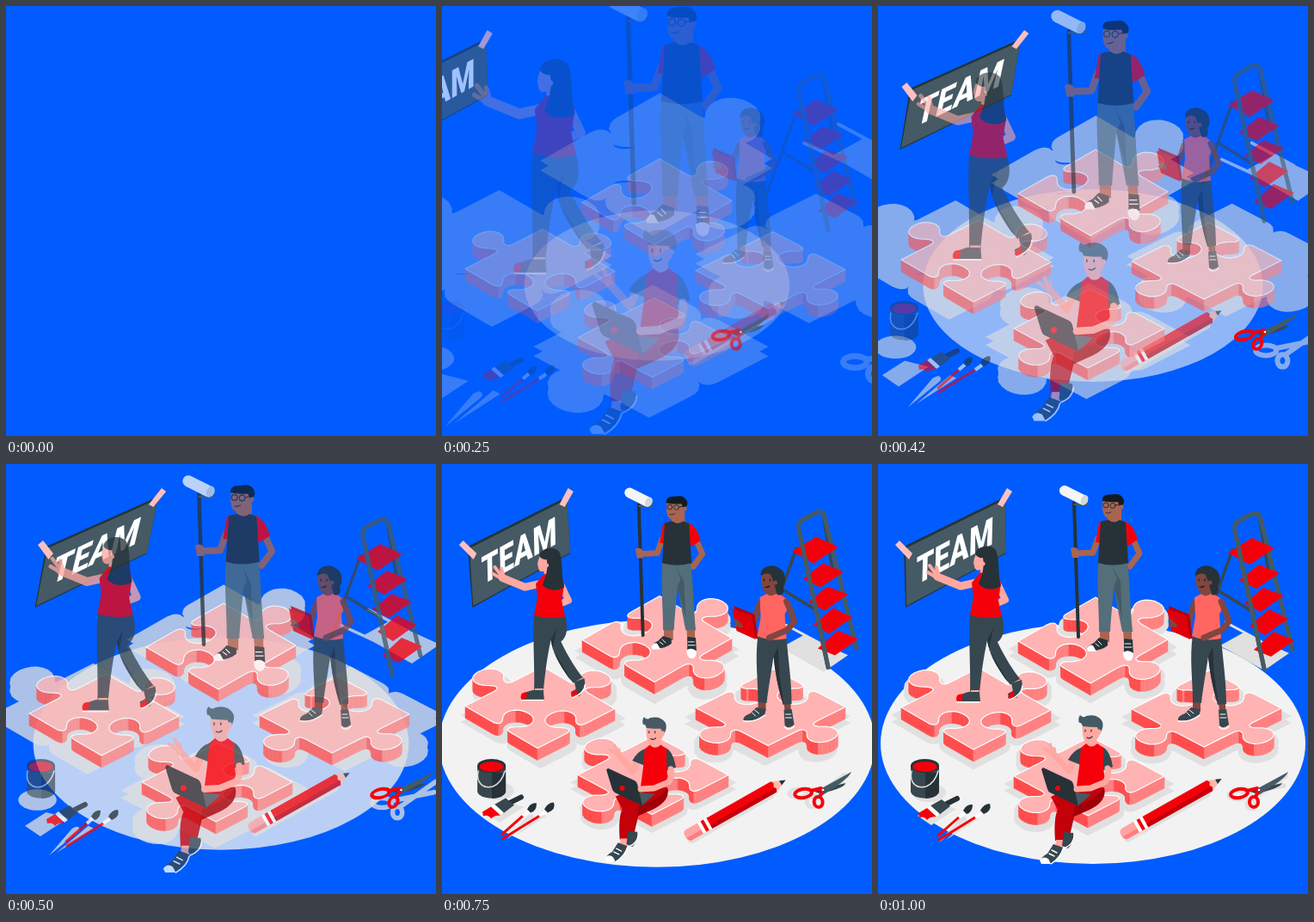
An HTML page for the animation above (1040 ms loop, 500 by 500 pixels).

```html
<!DOCTYPE html>
<html lang="en">
<head>
<meta charset="utf-8">
<title>Team</title>
<style>
html, body { margin: 0; width: 100%; height: 100%; overflow: hidden; background: #005cff; }
svg { display: block; width: 100vw; height: 100vh; }
.in { opacity: var(--p); }
.grow { transform: scale(calc(.5 + .5 * var(--p))); }
.shrink { transform: scale(calc(1.5 - .5 * var(--p))); }
.up { transform: translateY(calc(30px - 30px * var(--p))); }
.down { transform: translateY(calc(30px * var(--p) - 30px)); }
.side { transform: translateX(calc(30px * var(--p) - 30px)); }
.dash { opacity: var(--o); transform: translateX(var(--dx)) skewX(var(--skew)); }
.limb { fill: none; stroke-linecap: round; stroke-linejoin: round; }
.word { font: 900 40px Roboto, Inter, sans-serif; fill: #fff; }
</style>
</head>
<body>
<svg viewBox="0 0 500 500">
  <g class="in grow" style="transform-origin:250px 325px">
    <ellipse cx="250" cy="325" rx="247" ry="140" fill="#f2f2f2"/>
  </g>

  <g id="shadows" class="in shrink" style="transform-origin:252px 308px" fill="#e0e0e0" stroke="#e0e0e0">
    <g stroke="none">
      <path d="M398 211L425 196 478 220 449 240Z"/>
      <ellipse cx="59" cy="382" rx="20" ry="11"/>
      <path d="M46 409L68 395 91 401 62 420Z"/>
      <path d="M71 440L95 412Q103 407 103 414ZM79 437L112 409 118 412Z"/>
    </g>
    <path class="limb" stroke-width="3" d="M375 200L425 223M404 184L445 206"/>
    <g class="limb" stroke-width="5" transform="translate(0 -2)">
      <ellipse cx="418" cy="387" rx="10" ry="5"/><ellipse cx="434" cy="397" rx="5" ry="6"/>
      <path d="M428 385L472 376M437 391L474 365"/>
    </g>
  </g>

  <g class="in up">
    <g class="limb" stroke="#37474f" stroke-width="3.5">
      <path d="M412 100L378 195M444 66L455 130M397 148L436 172"/>
      <path stroke="#455a64" stroke-width="5" d="M482 216L445 64Q443 55 435 58L420 66Q413 70 415 78L449 238"/>
    </g>
    <g fill="#f5000a">
      <path d="M407 103L435 86 461 98 432 117Z"/><path d="M420 135L443 117 467 127 440 145Z"/>
      <path d="M426 162L448 144 472 153 445 172Z"/><path d="M432 188L455 169 477 180 450 199Z"/>
      <path d="M437 216L460 195 484 205 457 224Z"/>
    </g>
    <path class="limb" stroke="#455a64" stroke-width="5" d="M416 82L449 238"/>
  </g>

  <g class="in side"><g class="in side">
    <path fill="#37474f" d="M38 351V381C40 391 69 391 71 381V351Z"/>
    <path fill="#263238" d="M55 359H71V381C70 386 62 389 55 389Z"/>
    <ellipse cx="54.500" cy="351" rx="16.500" ry="8" fill="#263238"/>
    <ellipse cx="54.500" cy="352" rx="14" ry="6" fill="#f5000a"/>
    <path class="limb" stroke="#e0e0e0" stroke-width="1.500" d="M39 357C36 371 45 378 56 375Q66 371 70 357"/>
  </g></g>

  <g class="in up">
    <path class="limb" stroke="#263238" stroke-width="6" d="M78 396L92 389"/>
    <path fill="#37474f" d="M60 398L74 390 84 398 71 408Z"/>
    <path fill="#fff" d="M57 400L61 397 72 407 68 410Z"/>
    <path fill="#f5000a" d="M47 406L57 400 68 410Q60 410 57 414 54 409 48 411Z"/>
    <g class="limb">
      <path stroke="#f5000a" stroke-width="3" d="M70 432L96 409M71 437L116 409"/>
      <path stroke="#fff" stroke-width="4" stroke-linecap="butt" d="M94 411L101 405M113 411L121 405.500"/>
    </g>
    <path fill="#263238" d="M99 403Q103 395 110 396 110 405 103 407ZM119 403Q123 395 130 395 133 403 123 407Z"/>
  </g>

  <g class="in down">
    <g transform="translate(290 428) rotate(-29.500)">
      <path fill="#e0e0e0" d="M-8 6H108L104 11H-2Q-8 11-8 6Z"/>
      <rect x="-8" y="-7" width="24" height="14" rx="5" fill="#ffa3a3"/>
      <path fill="#ff7d7d" d="M-7 2H16V7H-3Q-7 7-7 2Z"/>
      <path fill="#fff" d="M12-7H26V7H12Z"/>
      <path fill="#f5000a" d="M16-7H20V7H16ZM24-7H110L113-3 110 0 113 4 110 7H24Z"/>
      <path fill="#c4000a" d="M24 2H112L110 7H24Z"/>
      <path fill="#ffb8a8" d="M110-7L121-2V2L110 7 112 3 110 0 112-4Z"/>
      <path fill="#263238" d="M119-3L126 0 119 3Z"/>
    </g>
  </g>

  <g id="pieces" class="in up"></g>

  <g class="dash" style="transform-origin:92px 98px">
    <path fill="#263238" d="M30 96L148 38 149 104 32 167Z"/>
    <path fill="#455a64" d="M32 98L148 41 149 103 33 165Z"/>
    <text class="word" transform="matrix(.82 -.44 -.03 1.13 44 141)">TEAM</text>
    <path fill="#ffbfbf" d="M20 94L25 89 40 104 36 111ZM139 47L150 28 156 32 145 50Z"/>
  </g>

  <g class="in shrink" style="transform-origin:112px 186px">
    <path class="limb" stroke="#ffa8a0" stroke-width="8" d="M139 139L148 158 138 162"/>
    <path fill="#37474f" d="M107 174L144 176C148 192 146 202 139 207 148 226 157 240 166 251L154 257C142 241 130 225 127 205 122 228 120 246 118 267H107C108 240 105 200 107 174Z"/>
    <path fill="#263238" d="M127 205L134 191 129 216 152 254 148 250C137 234 129 220 127 205Z"/>
    <path fill="#ffa8a0" d="M108 263H118L117 270H107ZM154 256L165 250 166 256 157 260Z"/>
    <path fill="#37474f" d="M105 265L118 265 119 276H92Q91 271 96 268ZM155 255L167 251Q170 262 161 272L152 272 151 267 157 264Z"/>
    <path fill="#f5000a" d="M91 274Q91 266 99 268L97 276H92ZM151 271L157 263 159 272 153 274Z"/>
    <path class="limb" stroke="#fff" stroke-width="1.500" d="M92 277H118M153 274Q167 269 168 258"/>
    <path class="limb" stroke="#ffa8a0" stroke-width="9" d="M114 138L96 142 69 131"/>
    <path class="limb" stroke="#ffa8a0" stroke-width="4" d="M69 130L60 118M68 132L58 126M70 127L68 120"/>
    <path fill="#ffa8a0" d="M114 104C112 110 110 114 112 118 112 124 117 124 119 123L118 130 128 131 127 106Z"/>
    <path fill="#f5000a" d="M109 138L119 126C129 131 140 128 143 138L140 159 144 177C132 180 116 179 107 175 109 164 112 155 110 148Z"/>
    <path fill="#263238" d="M113 105C115 95 130 92 137 100 142 111 139 129 143 142 134 148 122 146 117 139 121 129 124 121 122 109Q117 110 113 105Z"/>
    <circle cx="122" cy="116" r="2.500" fill="#ffa8a0"/>
  </g>

  <g class="in shrink" style="transform-origin:259px 126px">
    <path class="limb" stroke="#263238" stroke-width="4" d="M228 45L233 201"/>
    <path class="limb" stroke="#455a64" stroke-width="2" d="M228 47L243 47 243 43"/>
    <path class="limb" stroke="#f5f5f5" stroke-width="12" d="M217 31L238 41.500"/>
    <ellipse cx="240" cy="42" rx="4" ry="6" fill="#cfd8dc" transform="rotate(25 240 42)"/>
    <g class="limb" stroke="#a86550" stroke-width="7">
      <path d="M256 86L250 103 229 104"/><path d="M296 86L304 104 293 119"/>
    </g>
    <path fill="#a86550" d="M224 98Q230 95 233 100V109H226ZM258 192H269V207H258ZM285 192H295V208H286Z"/>
    <path fill="#546e7a" d="M256 114L290 114C293 138 293 165 296 195H284C280 175 277 158 274 143 273 160 271 176 270 195H257C257 165 254 140 256 114Z"/>
    <path fill="#455a64" d="M274 143L278 134 273 120 282 137 284 180Z"/>
    <path fill="#263238" d="M257 202L267 205 267 211Q259 218 244 217 243 211 251 208ZM286 203L296 204 297 222Q291 227 286 222Z"/>
    <path fill="#fff" d="M243 215Q246 209 250 211L254 218H244ZM285 219Q291 215 297 220 297 229 291 229 285 228 285 219Z"/>
    <path class="limb" stroke="#fff" stroke-width="1" d="M253 209L257 212M256 206L260 210M287 209H294M287 213H295"/>
    <path fill="#a86550" d="M265 56L283 50V68Q273 73 268 67Z"/>
    <path fill="#f5000a" d="M257 68L266 65 264 92 253 91ZM281 66Q296 66 302 88L291 95 285 90Z"/>
    <path fill="#263238" d="M259 67L268 65Q274 70 281 65L288 68 291 115Q273 120 256 115Z"/>
    <path fill="#a86550" d="M262 41C260 50 261 58 265 62 273 64 280 59 281 52L285 48 283 40Z"/>
    <path fill="#111c22" d="M261 43C260 34 270 36 275 35 283 34 287 41 286 45L282 52 279 44Q268 45 261 43Z"/>
    <g class="limb" stroke="#263238">
      <circle cx="265" cy="48" r="3"/><circle cx="273" cy="48.500" r="3"/><path d="M276 48L281 47M265 57Q268 58 271 56"/>
    </g>
    <circle cx="283" cy="50" r="2.500" fill="#a86550"/>
  </g>

  <g class="in side">
    <path class="limb" stroke="#80463f" stroke-width="7" d="M368 162L361 183 346 188"/>
    <path fill="#b5000a" d="M338 165L362 175 366 204 343 193Z"/>
    <path fill="#e0000a" d="M336 168L359 177 363 204 341 194Z"/>
    <path class="limb" stroke="#80463f" stroke-width="4" d="M340 182L346 188 340 187"/>
    <path fill="#80463f" d="M366 273H375V287H366ZM396 276H404V288H397Z"/>
    <path fill="#37474f" d="M366 199L399 202C401 228 405 252 405 279L395 280C389 260 386 242 384 224 381 244 378 260 376 278L366 277C366 250 362 225 366 199Z"/>
    <path fill="#263238" d="M384 224L389 213 391 246 396 280C388 258 386 242 384 224Z"/>
    <path fill="#37474f" d="M364 283L375 285 374 291Q361 301 349 298 348 293 357 290ZM396 286L405 285 408 303Q402 309 397 304Z"/>
    <path class="limb" stroke="#fff" stroke-width="1.500" d="M349 299Q362 301 374 292M397 306Q402 311 408 305"/>
    <path class="limb" stroke="#fff" stroke-width="1" d="M359 289L363 293M362 286L367 290M398 291H404M398 295H405"/>
    <path fill="#80463f" d="M374 141L388 139 387 154Q380 159 375 153Z"/>
    <path fill="#ff6662" d="M368 155L376 151Q382 156 388 150 399 154 402 164L397 175 399 203Q381 207 365 200L369 178Z"/>
    <path class="limb" stroke="#80463f" stroke-width="7" d="M399 160Q404 170 408 183L400 193 379 202"/>
    <path fill="#80463f" d="M371 124C368 134 370 146 374 148 382 150 386 143 388 140L389 124Z"/>
    <path fill="#263238" d="M369 130C368 119 383 115 390 121 399 125 399 138 395 142 397 149 395 154 388 152L385 140 381 129Q377 125 369 130Z"/>
    <path class="limb" stroke="#2b1512" stroke-width="1.200" d="M373 134V136M380 134V136M374 143Q377 144 379 142"/>
    <circle cx="386" cy="138" r="2.500" fill="#80463f"/>
  </g>

  <g class="in shrink" style="transform-origin:232px 378px">
    <path class="limb" stroke="#ffa8a0" stroke-width="7" d="M227 345L222 357 205 338"/>
    <path class="limb" stroke="#ffa8a0" stroke-width="3.500" d="M204 338L194 331M204 336L200 326M206 337L205 331"/>
    <path fill="#a00008" d="M228 388L263 376Q267 392 246 402L228 410 223 432 212 431Z"/>
    <path fill="#c4000a" d="M201 387Q215 379 232 377L262 376Q259 388 229 398L221 438 206 438Q204 412 209 402Z"/>
    <path fill="#ffa8a0" d="M207 437H218L215 446H206Z"/>
    <path fill="#37474f" d="M216 428L227 429Q229 438 221 447L214 444ZM204 442L215 446Q212 457 200 465L189 463Q189 457 197 453Z"/>
    <path fill="#fff" d="M188 461Q192 455 198 459L201 465H190Z"/>
    <path class="limb" stroke="#fff" stroke-width="1.400" d="M201 465Q213 458 215 448M216 447Q227 443 228 433M199 453L205 456M202 449L208 452"/>
    <path fill="#37474f" d="M236 330L244 326 236 350 221 344Q227 333 236 330ZM256 328Q269 328 273 352L260 357Z"/>
    <path fill="#ffa8a0" d="M241 316L254 316 255 328Q248 334 241 327Z"/>
    <path fill="#f5000a" d="M236 330L242 325Q248 332 255 325L262 330 262 354 265 373Q250 381 231 375L234 352Z"/>
    <path fill="#ffa8a0" d="M238 302C237 312 238 321 243 324 251 326 256 319 258 314L260 301 249 297Z"/>
    <path fill="#455a64" d="M238 305Q236 300 234 301 232 296 235 292 239 296 242 293 254 290 260 298 264 304 258 314L255 306Q246 306 238 305Z"/>
    <path class="limb" stroke="#263238" stroke-width="1.200" d="M241 309V311M248 309V311M243 318Q246 320 249 317"/>
    <circle cx="257" cy="311" r="2.600" fill="#ffa8a0"/>
    <path fill="#455a64" d="M222 381L248 384 232 398Z"/>
    <path fill="#263238" d="M192 353L224 368Q226 369 227 372L233 398 200 382Q198 381 197 378L190 355Z"/>
    <circle cx="209" cy="377" r="3" fill="#f5000a"/>
    <path class="limb" stroke="#ffa8a0" stroke-width="7" d="M267 354Q269 364 264 370L247 377 231 378"/>
  </g>

  <g class="dash" style="transform-origin:442px 380px">
    <path fill="#37474f" d="M430 380L470 371Q466 378 439 383Z"/>
    <path fill="#455a64" d="M437 388L442 377 477 358Q474 366 444 384Z"/>
    <g class="limb" stroke="#f5000a" stroke-width="4">
      <ellipse cx="420" cy="383" rx="10" ry="5" transform="rotate(-10 420 383)"/>
      <ellipse cx="437" cy="393" rx="5" ry="6"/>
      <path d="M429 380L441 377M439 387L442 381"/>
    </g>
    <circle cx="443" cy="379" r="1.300" fill="#fff"/>
  </g>
</svg>
<script>
// Jigsaw pieces: the fourth corner follows from the other three;
// knobs list the four edges from lower left, counter-clockwise: 1 out, -1 in.
const pieces = [
  { left: [163, 206], right: [337, 204], top: [253, 155], knobs: [-1, 1, 1, -1] },
  { left: [27, 283], right: [201, 286], top: [117, 237], knobs: [-1, -1, 1, 1] },
  { left: [295, 285], right: [469, 284], top: [385, 240], knobs: [1, 1, -1, -1] },
  { left: [158, 363], right: [333, 363], top: [247, 317], knobs: [1, -1, -1, 1] }
];
const half = [[.37, 0], [.46, 0], [.45, .06], [.41, .1], [.29, .2], [.35, .35], [.5, .35]];
const knob = half.concat(half.slice(0, -1).reverse().map(([a, n]) => [1 - a, n]));
const depth = 14;

function bezier(a, b, c, d, t) {
  const s = 1 - t;
  return s * s * s * a + 3 * s * s * t * b + 3 * s * t * t * c + t * t * t * d;
}

const profile = [[0, 0]];
for (let i = 0; i < knob.length - 1; i += 3) {
  for (let j = 0; j <= 8; j++) {
    profile.push([0, 1].map(k => bezier(...knob.slice(i, i + 4).map(q => q[k]), j / 8)));
  }
}

function outline({ left, right, top, knobs }) {
  const bottom = [0, 1].map(k => left[k] + right[k] - top[k]);
  const corners = [left, bottom, right, top];
  return corners.flatMap((from, i) => {
    const to = corners[(i + 1) % 4], prev = corners[(i + 3) % 4];
    return profile.map(([a, n]) => [0, 1].map(k =>
      from[k] + a * (to[k] - from[k]) + knobs[i] * n * (from[k] - prev[k])));
  });
}

function walls(points) {
  return points.map((p, i) => [p, points[(i + 1) % points.length]])
    .filter(([p, q]) => q[0] > p[0])
    .sort((a, b) => a[0][1] + a[1][1] - b[0][1] - b[1][1])
    .map(([[x, y], [u, v]]) => {
      const color = v > y ? "#ff4d4d" : "#ff8080";
      return `<path d="M${x} ${y}L${u} ${v}v${depth}L${x} ${y + depth}Z" fill="${color}" stroke="${color}" stroke-width=".5"/>`;
    }).join("");
}

// A shadow spreads a little past the piece and is swept down the floor.
const shadow = d => [9, 17].map(y =>
  `<path d="${d}" transform="translate(0 ${y})" stroke-width="11"/>`).join("");

let faces = "", shades = "";
for (const piece of pieces) {
  const points = outline(piece).map(p => p.map(n => +n.toFixed(1)));
  const d = "M" + points.join("L") + "Z";
  faces += walls(points) + `<path d="${d}" fill="#ffb3b3" stroke="#fff" stroke-width="1.2" stroke-linejoin="round"/>`;
  shades += shadow(d);
}
document.getElementById("pieces").innerHTML = faces;
document.getElementById("shadows").insertAdjacentHTML("beforeend", shades);

// cubic-bezier(.36, -.01, .5, 1.38)
function ease(x) {
  let lo = 0, hi = 1;
  for (let i = 0; i < 30; i++) {
    const mid = (lo + hi) / 2;
    if (bezier(0, .36, .5, 1, mid) < x) lo = mid; else hi = mid;
  }
  return bezier(0, -.01, 1.38, 1, lo);
}

// Quick sideways entry with a swinging slant.
function dash(x) {
  if (x < .6) {
    const e = ease(x / .6);
    return { dx: 250 * (e - 1), skew: 20 - 30 * e, o: e };
  }
  if (x < .8) return { dx: 0, skew: 12 * ease((x - .6) / .2) - 10, o: 1 };
  return { dx: 0, skew: 2 - 2 * ease((x - .8) / .2), o: 1 };
}

const style = document.documentElement.style;
const loop = 1040, fps = 24;

function draw(now) {
  const step = Math.floor((now % loop + 4) * fps / 1000);
  const x = step ? Math.min(1, (step + .3) / fps) : 0;
  const { dx, skew, o } = dash(x);
  style.setProperty("--p", ease(x).toFixed(4));
  style.setProperty("--dx", dx.toFixed(2) + "px");
  style.setProperty("--skew", skew.toFixed(2) + "deg");
  style.setProperty("--o", o.toFixed(4));
}

const start = performance.now();
function tick() {
  draw(performance.now() - start);
  requestAnimationFrame(tick);
}
tick();
</script>
</body>
</html>
```
